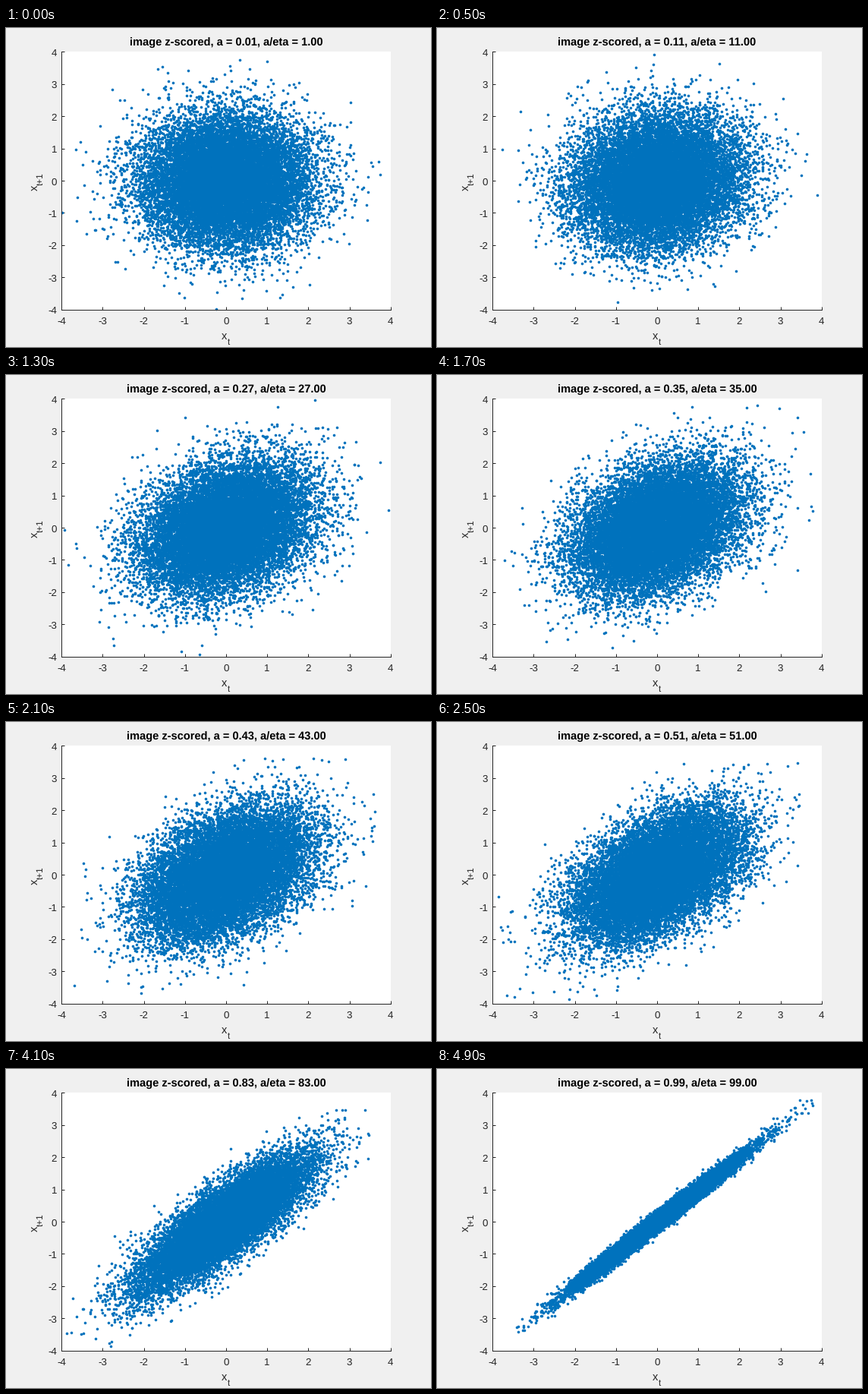
Recreate the animation shown at these times as a matplotlib script. Size 560x420 px, loop 5 s.

```python
from itertools import accumulate

import numpy as np
import matplotlib.pyplot as plt
from matplotlib.animation import FuncAnimation

W, H, DPI = 560, 420, 100
FRAMES, INTERVAL = 50, 100
SAMPLES = 128 * 128
ETA = 0.01
LEFT, RIGHT, TOP, BOTTOM = 73.2, 506.8, 31.2, 370.8
LIMIT = 4
BLUE, INK = "#0072BD", "#262626"
PT = 72 / DPI  # points per pixel

plt.rcParams["font.family"] = "Liberation Sans"
plt.rcParams["text.hinting"] = "none"
fig = plt.figure(figsize=(W / DPI, H / DPI), dpi=DPI, facecolor="#F0F0F0")
ax = fig.add_axes([LEFT / W, 1 - BOTTOM / H, (RIGHT - LEFT) / W, (BOTTOM - TOP) / H])
ax.set(xlim=(-LIMIT, LIMIT), ylim=(-LIMIT, LIMIT))
ticks = range(-LIMIT, LIMIT + 1)
ax.set_xticks(ticks)
ax.set_yticks(ticks)
ax.tick_params(direction="in", length=4.3 * PT, width=PT, color=INK,
               labelbottom=False, labelleft=False)
for side, spine in ax.spines.items():
    spine.set(visible=side in ("left", "bottom"), color=INK, linewidth=PT)


def label(x, y, text, size, **style):
    """Place text with its baseline at a pixel position measured from the top left."""
    style = {"color": INK, "va": "baseline", "rotation_mode": "anchor", **style}
    return fig.text(x / W, 1 - y / H, text, fontsize=size * PT, **style)


for tick in ticks:
    share = (tick + LIMIT) / (2 * LIMIT)
    label(LEFT + share * (RIGHT - LEFT), 390, str(tick), 13.33, ha="center")
    label(67, BOTTOM - share * (BOTTOM - TOP) + 5.5, str(tick), 13.33, ha="right")

label(284, 410, "x", 14.67)
label(292, 417, "t", 11.73)
label(42, 214, "x", 14.67, rotation=90)
label(49, 207, "t+1", 11.73, rotation=90)
title = label(290, 24, "", 14.67, ha="center", weight="bold", color="black")

dots, = ax.plot([], [], "o", color=BLUE, markersize=3.6 * PT,
                markeredgewidth=0, clip_on=False)


def autoregression(a, seed):
    """Z-scored first-order chain with correlation a between neighbours."""
    noise = np.random.default_rng(seed).standard_normal(SAMPLES + 1)
    noise[1:] *= np.sqrt(1 - a * a)
    chain = np.array(list(accumulate(noise.tolist(), lambda x, e: a * x + e)))
    return (chain - chain.mean()) / chain.std()


def update(frame):
    a = 0.01 + 0.02 * frame
    chain = autoregression(a, 100 + frame)
    x, y = chain[:-1], chain[1:]
    inside = (abs(x) <= LIMIT) & (abs(y) <= LIMIT)
    dots.set_data(x[inside], y[inside])
    title.set_text(f"image z-scored, a = {a:.2f}, a/eta = {a / ETA:.2f}")
    return dots, title


animation = FuncAnimation(fig, update, frames=FRAMES, interval=INTERVAL,
                          repeat=True, repeat_delay=0, blit=False)
plt.show()
```
